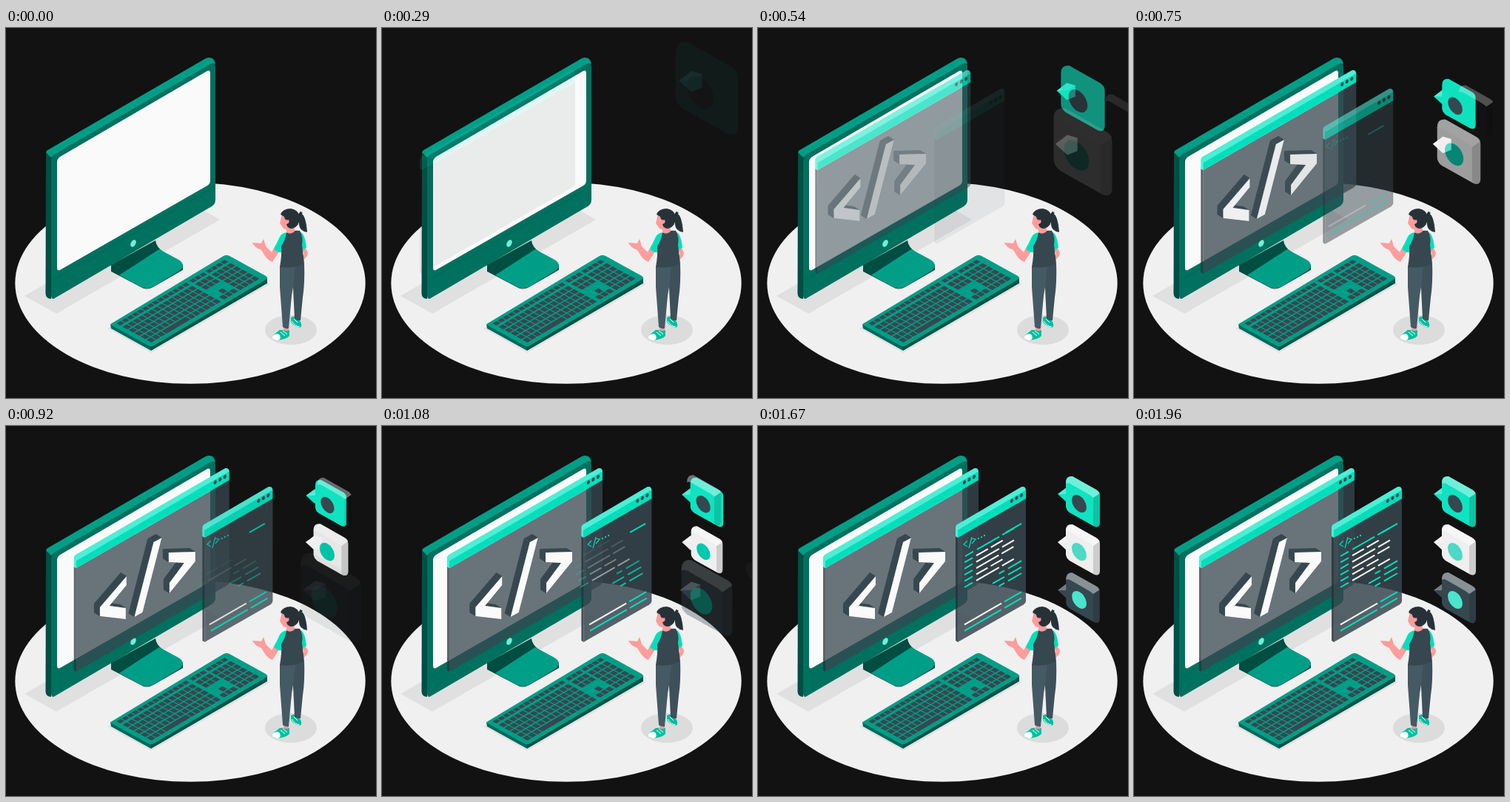
Recreate the animation shown at these times as an HTML page. Size 500 px wide and 500 px high, loop 2000 ms.

```html
<!DOCTYPE html>
<html lang="en">
<head>
<meta charset="utf-8">
<style>
html, body { margin: 0; width: 100%; height: 100%; overflow: hidden; background: #121212; }
svg { display: block; width: 100vw; height: 100vh; }
</style>
</head>
<body>
<svg id="stage" viewBox="0 0 500 500"></svg>
<script>
const DARK = '#37474f', MINT = '#00dfbc', TEAL = '#009e87', SKIN = '#ff9c9c', SLOPE = .574;
const stage = document.getElementById('stage');
const path = (d, fill, extra = '') => `<path d="${d}" fill="${fill}" ${extra}/>`;
const poly = (points, fill) => `<polygon points="${points}" fill="${fill}"/>`;
const ellipse = (x, y, rx, ry, fill, tilt = 0) =>
  `<ellipse cx="${x}" cy="${y}" rx="${rx}" ry="${ry}" fill="${fill}" transform="rotate(${tilt} ${x} ${y})"/>`;
const group = (id, body) => `<g id="${id}">${body}</g>`;

const floor = ellipse(249, 344.8, 236.7, 136, '#f0f0f0') +
  poly('25,362 68,386 289,259 246,234', '#e0e0e0') +
  poly('137,406 196,439 357,346 300,310', '#e2e2e2') +
  ellipse(385, 408, 35, 20, '#dcdcdc');

const monitor =
  path('M142 320L202 287Q203 296 212 302L239 320V327L199 350Q190 355 182 350L142 329Z', '#004d42') +
  path('M207 299L233 313Q243 319 236 327L200 349Q191 354 183 350L153 334Z', TEAL) +
  path('M54 168L61 173V366Q54 366 53.5 359Z', '#004f44') +
  path('M54 168Q55 165 58 164L270 41Q277 38 281 43L283 48L61 175Z', TEAL) +
  path('M61 178Q61 174 65 171L274 50Q283 44 283 53V232Q283 238 278 241L66 365Q61 368 61 361Z', '#00705f') +
  path('M61 342L283 214', 'none', 'stroke="#006556" stroke-width=".7"') +
  path('M69 181Q69 177 73 174L272 58Q276 56 276 61V206Q276 211 272 213L73 327Q69 329 69 324Z', '#fafafa') +
  ellipse(172, 291, 3.3, 5.2, '#6ff0d8', 28);

// Keys sit on a grid of 21 columns by 6 rows on the keyboard's isometric top face.
function keys() {
  const pitch = .0435, gap = .02;
  let out = '';
  for (let row = 0; row < 6; row++) {
    for (let col = 0; col < 21; col++) {
      const space = row == 5 && col == 3, nav = col > 13 && col < 17;
      if (row == 5 && col > 3 && col < 8) continue;
      if (nav && (row == 3 || row == 4 && col != 15)) continue;
      const x = .03 + col * pitch + (col > 13) * gap + (col > 16) * gap / 2;
      out += `<rect x="${x}" y="${.07 + row * .147}" width="${space ? pitch * 5 - .008 : .0355}" height="${row ? .118 : .09}"/>`;
    }
  }
  return `<g fill="${DARK}" transform="matrix(156 -92 55 30 141 400)">${out}</g>`;
}

const keyboard =
  path('M141 400L196 430V436L142 406Z', '#00695b') +
  path('M196 430L353 337V345L196 436Z', '#005347') +
  path('M143 399L294 308Q298 306 302 308L351 335Q355 338 351 340L200 429Q196 431 192 429L143 402Q140 401 143 399Z', TEAL) +
  keys();

const person =
  path('M385 391L391 389L398 397Q401 403 397 405Q389 403 385 397Z', '#00bfa0') +
  path('M370 408H383V416Q379 421 366 422Q358 421 360 416Z', '#00bfa0') +
  path('M360 416Q365 412 369 414Q373 419 368 422Q358 422 360 416Z', '#fff') +
  path('M371 411L377 416M374 409L380 414M389 393L394 398M386 396Q390 403 397 404', 'none', 'stroke="#fff"') +
  path('M375 402H382V409H375ZM391 390H398V395Z', SKIN) +
  path('M384 321L403 318Q404 345 401 364L398 395Q394 396 390 393L388 352Z', '#3e5059') +
  path('M370 322L391 321Q390 342 386 362L382 406Q378 407 374 404L370 350Z', '#455a64') +
  path('M402 296Q410 301 407 308L401 315L399 311L403 305L399 298Z', SKIN) +
  path('M371 299L360 316Q354 314 350 308L345 300Q336 297 333 290L345 291L348 285L351 295L359 303L365 292Z', SKIN) +
  path('M398 276Q404 278 406 297L400 301L397 287Z', MINT) +
  path('M380 276Q373 277 370 282L362 299Q367 304 373 303L381 287Z', MINT) +
  path('M379 277Q386 273 397 274Q402 282 400 293L403 318Q388 326 370 323Q373 306 372 295Q377 287 379 277Z', DARK) +
  path('M379 266L390 267V275Q384 280 379 276Z', SKIN) +
  path('M373 251L384 253L386 267Q382 274 375 271L370 264Z', SKIN) +
  path('M371 252Q374 244 385 244Q396 246 397 256Q397 268 387 271Q380 271 379 265Q384 264 382 259Q377 261 376 255Z', '#263238') +
  path('M396 250Q405 249 407 276Q396 274 396 265Z', '#263238') +
  path('M397 249L400 251', 'none', 'stroke="#263238" stroke-width="3"');

// Slanted browser window from x0 to x1; y is the header's height at the left edge.
function pane(x0, x1, y, bottom, alpha) {
  const left = x0 + 3, rise = (x1 - left) * SLOPE, top = y - rise, end = bottom - rise;
  const dots = [19, 12.5, 6].map(d => ellipse(x1 - d, top + 5 + d * SLOPE, 1.9, 2.8, DARK, 22)).join('');
  return path(`M${x0} ${y + 11}L${left} ${y + 13}V${bottom}L${x0} ${bottom - 2}Z`, '#263238', `opacity="${alpha}"`) +
    path(`M${left} ${y + 13}L${x1} ${top + 13}V${end - 3}Q${x1} ${end} ${x1 - 3} ${end + 2}L${left} ${bottom}Z`, DARK, `opacity="${alpha}"`) +
    path(`M${x0} ${y - 1}Q${x0} ${y - 4} ${x0 + 4} ${y - 6}L${x1 - 6} ${top - 3}Q${x1} ${top - 4} ${x1} ${top + 2}L${left} ${y + 3}V${y + 13}L${x0} ${y + 11}Z`, '#4eeed6') +
    path(`M${left} ${y + 3}L${x1} ${top + 1}V${top + 13}L${left} ${y + 13}Z`, MINT) + dots;
}

// A white face with dark sides reaching back to the upper left.
function extrude(face) {
  const points = face.split(' ').map(p => p.split(',').map(Number));
  const back = ([x, y]) => [x - 8, y - 5];
  return points.map((p, i) => {
    const q = points[(i + 1) % points.length];
    return poly([p, q, back(q), back(p)].join(' '), DARK);
  }).join('') + poly(face, '#fafafa');
}
const glyphs = [
  '123,245 159,203 159,215 136,243 158,246 158,261 123,257',
  '196,157 207,151 181,252 170,258',
  '217,171 253,170 253,183 218,226 218,212 238,185 217,184'
].map(extrude);

// Code lines: short keys with values, then indented ends, then two full rows.
const LINES = 13;
const span = (row, x0, x1, color) => {
  const y = x => 176 + 8.4 * row - (x - 279) * SLOPE;
  return path(`M${x0} ${y(x0)}L${x1} ${y(x1)}`, 'none', `stroke="${color}" stroke-width="2"`);
};
function codeLine(i) {
  const r = Math.abs(Math.sin(i * 2.1 + 1));
  if (i < 6) {
    const mid = 310 + 18 * r, color = i ? '#fafafa' : MINT;
    return span(i, 279, 290, MINT) + span(i, 295, mid, color) + span(i, mid + 4, mid + 20, color);
  }
  if (i < 9) return span(i, 317 + 10 * r, 333, MINT) + span(i, 338, 356, MINT);
  if (i < 11) return '';
  return span(i, 279, 329, i == 11 ? '#fafafa' : MINT) + span(i, 333, 356, MINT);
}
const title = path('M283 155L278 160L283 163M289 150L285 165M289 152L294 153L289 159', 'none', `stroke="${MINT}" stroke-width="1.2"`) +
  [298, 302, 306].map(x => ellipse(x, 152 - (x - 298) * .5, 1, 1.2, MINT)).join('') +
  span(0, 335, 356, MINT);

// Speech tiles, as pairs of base and badge colours.
const tiles = [['#0fe3c1', DARK], ['#efefef', '#00c9ad'], [DARK, '#00d8b6']];
const faces =
  path('M453 97L462 91V131Q462 138 455 136Q453 135 453 131Z', '#000', 'opacity=".14"') +
  path('M416 78Q416 67 425 68L457 86Q461 88 462 91L453 97Q451 95 448 93L422 78Q418 76 416 78Z', '#fff', 'opacity=".4"');
const badge = (fill, alpha = 1) =>
  `<circle r="11" fill="${fill}" opacity="${alpha}" transform="matrix(.9 .45 0 1 434 105)"/>`;
const tile = ([base, mark], i) => `<g transform="translate(0 ${65 * i})">` +
  group('tail' + i, poly('405,92 417,83 427,86 427,99 417,103', base) +
    `<g opacity=".3">${poly('405,92 417,83 427,86 417,92', '#fff')}</g>`) +
  group('tile' + i,
    path('M416 76Q416 67 425 68L457 86Q462 89 462 94V131Q462 138 455 136L421 117Q416 113 416 108Z', base) +
    (i ? faces : '') + badge(mark)) +
  group('shine' + i, i ? badge('#fff', .3) : faces) + '</g>';

stage.innerHTML = floor + monitor + group('main', pane(88, 298, 179, 332, .75)) +
  glyphs.map((g, i) => group('glyph' + i, g)).join('') + keyboard +
  group('code', pane(267, 362, 138, 292, .84)) + group('title', title) +
  Array.from({ length: LINES }, (_, i) => group('line' + i, codeLine(i))).join('') +
  person + tiles.map(tile).join('');

const parts = {};
stage.querySelectorAll('g[id]').forEach(g => parts[g.id] = g);
const clamp = x => Math.min(1, Math.max(0, x));
const rest = p => (1 - p) * Math.cos(2.4 * p); // remaining distance, with overshoot
const fade = p => { const x = clamp((p - .14) / .56); return x * x * (3 - 2 * x); };

function place(id, alpha, transform) {
  parts[id].setAttribute('opacity', alpha);
  parts[id].setAttribute('transform', transform);
}

function draw(now) {
  // The motion runs at 24 steps per second; the first step holds the empty scene.
  const step = Math.floor((now % 2000 + 2) / 41.667);
  const t = step < 2 ? 0 : step * 41.667;
  const phase = (start, length) => clamp((t - start) / length);
  const slide = (id, start, from, length = 1000, slope = 0) => {
    const p = phase(start, length), x = from * rest(p);
    place(id, fade(p), `translate(${x} ${x * slope})`);
  };

  slide('main', 40, -60);
  glyphs.forEach((g, i) => slide('glyph' + i, 140 + 25 * i, -60));
  slide('code', 300, -45);
  slide('title', 450, -40, 900);
  for (let i = 0; i < LINES; i++) slide('line' + i, 900 - 38 * i, -35, 800);

  tiles.forEach((_, i) => {
    const p = phase(80 + 100 * i * (i + 1), 1000), r = rest(p), drop = i ? 0 : -30 * r;
    const grow = (id, x, y, scale, alpha) =>
      place(id + i, alpha, `translate(${x} ${y + drop}) scale(${1 + scale * r}) translate(${-x} ${-y})`);
    grow('tile', 439, 102, 1.2, fade(p));
    grow('tail', 414, 93, .6, clamp(fade(p) * 2));
  });
  slide('shine0', 125, 110, 1300, .4);
  slide('shine1', 850, 110, 755, .4);
  slide('shine2', 1210, 110, 700, .4);
}

const begin = performance.now();
function tick() {
  draw(performance.now() - begin);
  requestAnimationFrame(tick);
}
tick();
</script>
</body>
</html>
```
